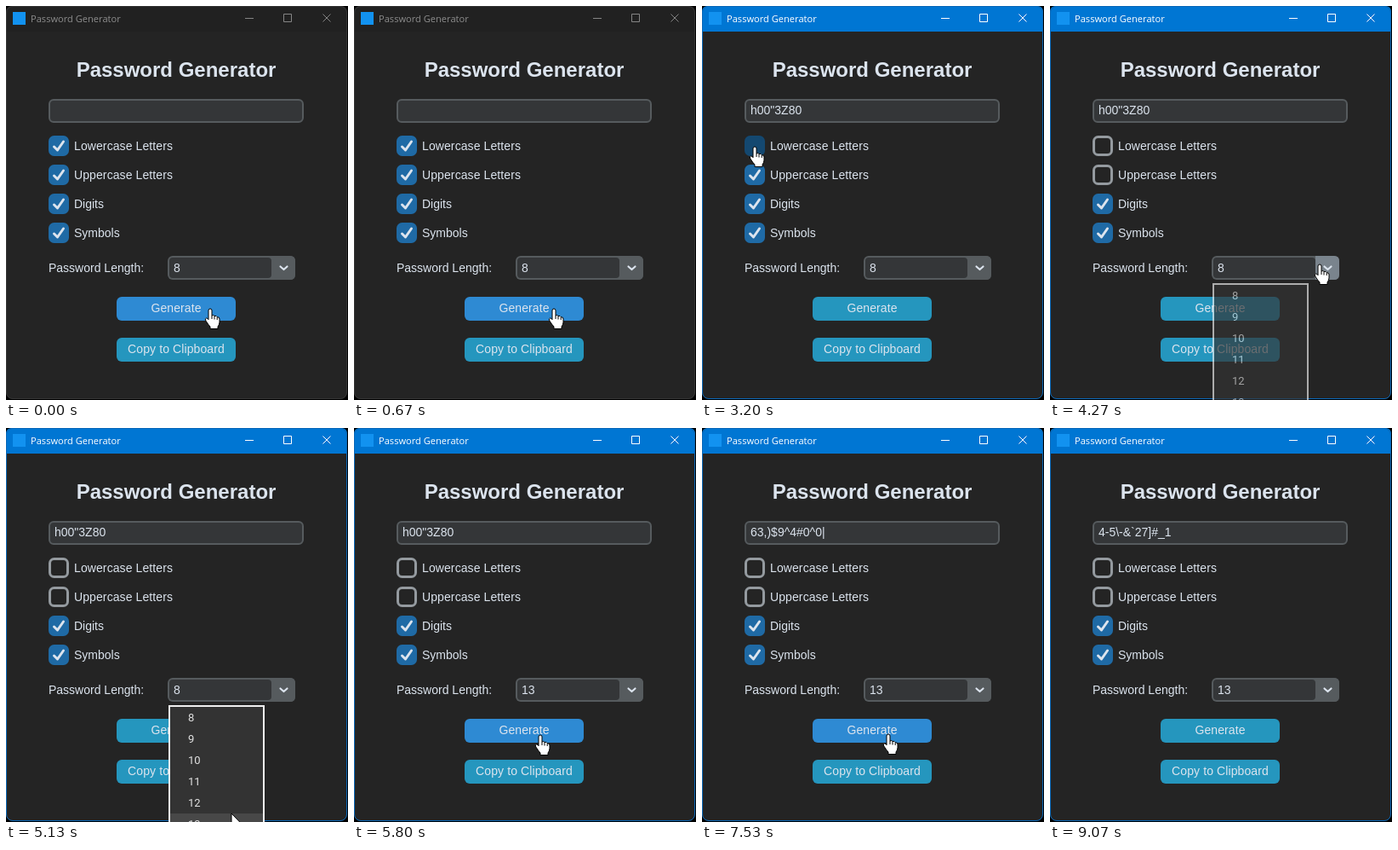
These frames come from a looping animation (402x462 px, 9140 ms). An HTML page:

```html
<!DOCTYPE html>
<html lang="en">
<head>
<meta charset="utf-8">
<title>Password Generator</title>
<style>
  html, body { margin: 0; width: 100%; height: 100%; overflow: hidden; background: #000; }
  svg { display: block; width: 402px; height: 462px; }
  text { font: 14px "Liberation Sans", Arial, sans-serif; fill: #dce4ee; white-space: pre; }
  .head { font-size: 24px; font-weight: bold; }
  .caption { font: 11.1px "Open Sans", sans-serif; }
  .item { font: 13px Roboto, sans-serif; fill: #e2e2e2; }
  .mid { text-anchor: middle; letter-spacing: .1px; }
  .line { fill: none; stroke-linecap: round; stroke-linejoin: round; }
</style>
</head>
<body>
<svg id="stage" viewBox="0 0 402 462"></svg>
<script>
const LOOP = 9140;
const NS = 'http://www.w3.org/2000/svg';
const stage = document.getElementById('stage');

function add(tag, attrs, parent = stage) {
  const el = document.createElementNS(NS, tag);
  set(el, attrs);
  parent.appendChild(el);
  return el;
}
function set(el, attrs) {
  for (const k in attrs) el.setAttribute(k, attrs[k]);
}
function label(str, x, y, cls = '', parent = stage) {
  const el = add('text', { x, y, class: cls }, parent);
  el.textContent = str;
  return el;
}
const box = (x, y, width, height, fill, rx = 0, parent = stage) =>
  add('rect', { x, y, width, height, fill, rx }, parent);
const show = (el, on) => el.setAttribute('visibility', on ? 'visible' : 'hidden');

// Window frame and title bar
box(0, 0, 401, 461, '#242424', 8);
const bar = add('path', { d: 'M0 30V7Q0 0 7 0H394Q401 0 401 7V30Z' });
const frame = add('rect', { x: .5, y: .5, width: 400, height: 460, rx: 7.5, fill: 'none' });
box(8, 7, 15, 15, '#1292f0');
const caption = label('Password Generator', 29, 19, 'caption');
const controls = add('path', {
  d: 'M281 14.5H291M326.5 9.5H335.5V18.5H326.5ZM372.5 9.5L381.5 18.5M381.5 9.5L372.5 18.5', fill: 'none'
});

// Form
label('Password Generator', 200, 83, 'head').setAttribute('text-anchor', 'middle');
set(box(51, 110, 298, 26, '#343638', 5), { stroke: '#565b5e', 'stroke-width': 2 });
const field = label('', 57, 127);

const checks = ['Lowercase Letters', 'Uppercase Letters', 'Digits', 'Symbols'].map((name, i) => {
  const y = 152 + i * 34;
  const square = set2(box(51.5, y + 1.5, 21, 21, 'none', 5), 3);
  const tick = add('path', {
    d: `M56.5 ${y + 13}L60.5 ${y + 17}L67.5 ${y + 7}`, class: 'line', stroke: '#dce4ee', 'stroke-width': 3
  });
  label(name, 80, y + 17).setAttribute('letter-spacing', i < 2 ? .1 : 0);
  return { square, tick, hit: [50, y, 146, 24] };
});
function set2(el, width) {
  el.setAttribute('stroke-width', width);
  return el;
}

label('Password Length:', 50, 312);
box(190, 293, 150, 28, '#565b5e', 6);
box(192, 295, 120, 24, '#343638', 4);
const arrowBox = add('path', { d: 'M312 293H334Q340 293 340 299V315Q340 321 334 321H312Z' });
add('path', { d: 'M322.5 305.5L326.5 309L330.5 305.5', class: 'line', stroke: '#dce4ee', 'stroke-width': 2.2 });
const size = label('', 197, 312);

const generate = box(130, 341, 140, 28, '#2596be', 6);
label('Generate', 200, 359, 'mid');
box(130, 389, 140, 28, '#2596be', 6);
label('Copy to Clipboard', 200, 407, 'mid');

// Drop-down list
const menu = add('g', {});
set(box(192, 326, 111, 150, '#333333', 0, menu), { stroke: '#f0f0f0', 'stroke-width': 2 });
const row = box(193, 0, 109, 25, '#484848', 0, menu);
for (let n = 8; n < 14; n++) label(n, 214, 344 + (n - 8) * 25, 'item', menu);

// Pointers, tip at 0,0
const ink = { fill: '#fff', stroke: '#000', 'stroke-width': 1, 'stroke-linejoin': 'round' };
const hand = add('g', ink);
add('path', {
  d: 'M-2 2Q-2 0 0 0Q2 0 2 2V8Q4 6.8 5 8.5Q7.4 7.8 8.2 9.7Q11 9.5 11 12V16Q10.6 19 9 21V23.5H0V21Q-2 19 -5.2 14Q-6.5 11.5 -4.5 11Q-3 11 -2 12.7Z'
}, hand);
add('path', { d: 'M2 8V12M5 9V12.5M8.2 10V13', fill: 'none' }, hand);
const arrow = add('path', { d: 'M0 0V17L4 13.3L6.7 19.5L9.3 18.3L6.6 12.3H12Z', ...ink });

// Pointer stops: time, x, y
const path = [
  [70, 240, 355], [670, 235, 355], [2270, 235, 355], [2930, 62, 165], [3200, 62, 165],
  [3400, 62, 198], [3530, 62, 198], [4070, 317, 303], [4340, 317, 303], [4930, 262, 436],
  [5070, 262, 436], [5130, 265, 452], [5330, 265, 452], [5800, 219, 360], [6070, 219, 359]
];
const passwords = [
  [0, ''], [1070, 'k7$Qw2;R'], [2200, 'h00"3Z80'], [7330, '63,)$9^4#0^0|'],
  [8600, '8=2"51~;70/*6'], [9000, '4-5\\-&`27]#_1']
];
const presses = [[1070, 1270], [2200, 2330], [7330, 7530], [8600, 8670], [9000, LOOP]];
const uncheckAt = [3070, 3470, Infinity, Infinity];

function pointerAt(t) {
  const i = path.findIndex(p => p[0] > t);
  if (i === 0) return path[0].slice(1);
  if (i < 0) return path[path.length - 1].slice(1);
  const [t0, x0, y0] = path[i - 1], [t1, x1, y1] = path[i];
  const u = (t - t0) / (t1 - t0), e = u * u * (3 - 2 * u);
  return [x0 + (x1 - x0) * e, y0 + (y1 - y0) * e];
}
const inside = ([px, py], [x, y, w, h]) => px >= x && px <= x + w && py >= y && py <= y + h;

function draw(ms) {
  const t = Math.round(Math.floor((ms + 4) * .015) * 20 / 3) * 10;
  const focus = t >= 1070;
  set(bar, { fill: focus ? '#0076d3' : '#212121' });
  set(frame, { stroke: focus ? '#0a68b8' : '#343434' });
  caption.style.fill = focus ? '#fff' : '#8c8c8c';
  set(controls, { stroke: focus ? '#fff' : '#858585' });

  const p = pointerAt(t);
  const open = t >= 4270 && t < 5330;
  const overGenerate = !open && inside(p, [130, 341, 140, 28]);
  const overCopy = !open && inside(p, [130, 389, 140, 28]);
  const overArrow = inside(p, [312, 293, 28, 28]);
  let useHand = overGenerate || overCopy || overArrow;

  checks.forEach((c, i) => {
    const on = t < uncheckAt[i], hover = inside(p, c.hit);
    useHand = useHand || hover;
    const fill = hover ? '#144870' : on ? '#1f6aa5' : 'none';
    set(c.square, { fill, stroke: fill === 'none' ? '#949a9f' : fill });
    show(c.tick, on);
  });

  field.textContent = passwords.filter(w => w[0] <= t).pop()[1];
  size.textContent = t < 5330 ? '8' : '13';
  const pressed = presses.some(([a, b]) => t >= a && t < b);
  set(generate, { fill: overGenerate && !pressed ? '#2e8ad3' : '#2596be' });
  set(arrowBox, { fill: overArrow ? '#7a848d' : '#565b5e' });

  show(menu, open);
  set(menu, { opacity: t < 4340 ? .67 : 1 });
  const n = Math.floor((p[1] - 327) / 25);
  set(row, { y: 327 + n * 25, opacity: open && n >= 0 && inside(p, [193, 327, 109, 150]) ? 1 : 0 });

  const visible = t < 9070;
  const at = `translate(${Math.round(p[0])} ${Math.round(p[1])})`;
  set(hand, { transform: at, visibility: visible && useHand ? 'visible' : 'hidden' });
  set(arrow, { transform: at, visibility: visible && !useHand ? 'visible' : 'hidden' });
}

const start = performance.now();
function tick() {
  draw((performance.now() - start) % LOOP);
  requestAnimationFrame(tick);
}
tick();
</script>
</body>
</html>
```
